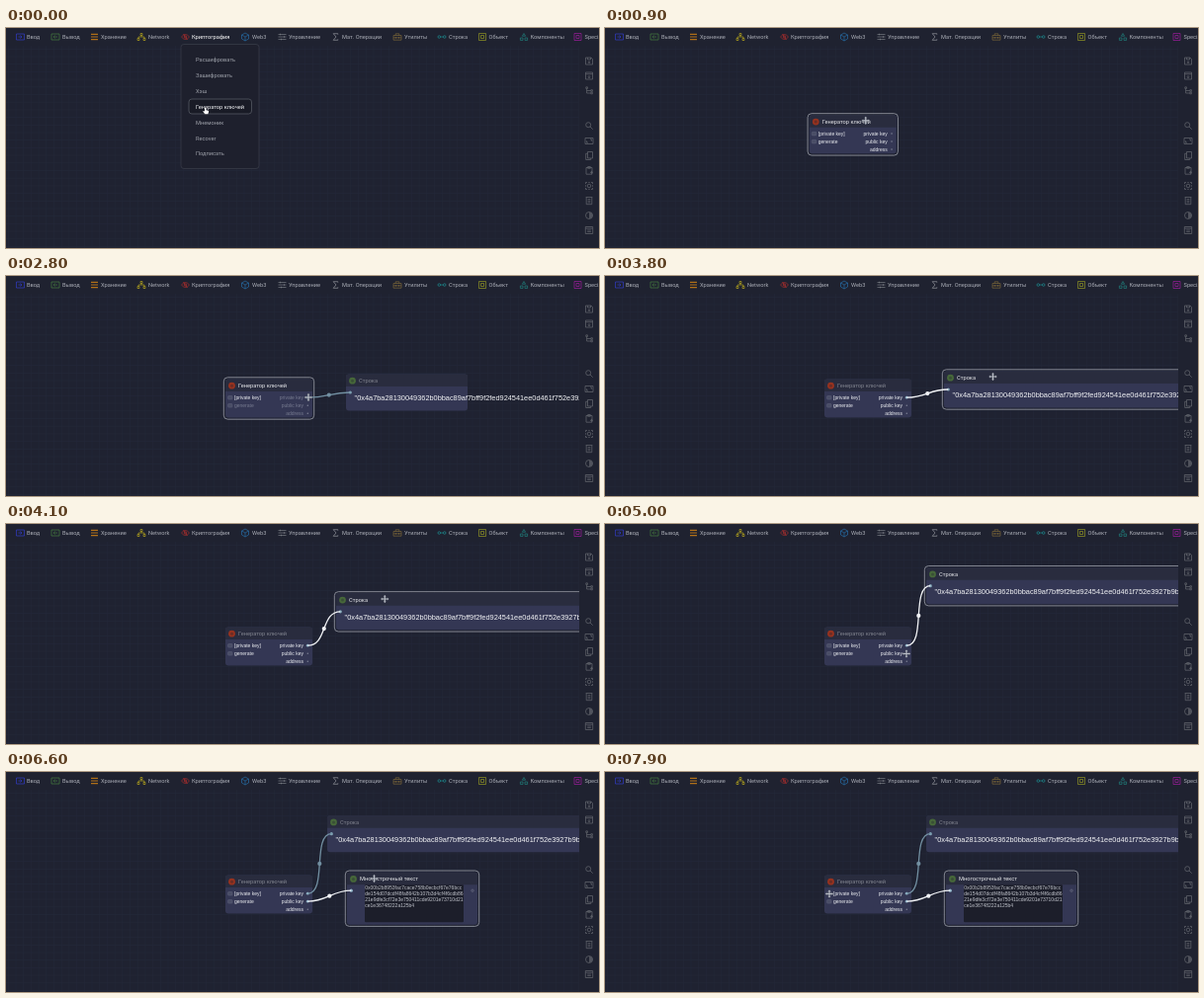
Animation, 600 px wide and 223 px high, one loop 8000 ms. Source, as an HTML page with a canvas:

```html
<!DOCTYPE html>
<html lang="ru">
<head>
<meta charset="utf-8">
<style>
html, body { margin: 0; width: 100%; height: 100%; overflow: hidden; background: #1f2231; }
canvas { display: block; width: 600px; height: 223px; }
</style>
</head>
<body>
<canvas id="stage"></canvas>
<script>
const W = 600, H = 223, LOOP = 8000, STEP = 100;
const UI = 'Roboto, "Open Sans", sans-serif';
const ARIAL = '"Liberation Sans", Arial, sans-serif';
const canvas = document.getElementById('stage');
const ctx = canvas.getContext('2d');
const scale = window.devicePixelRatio || 1;
canvas.width = W * scale;
canvas.height = H * scale;

// Icon outlines, drawn around their own centre
const ICONS = {
  input: 'M-4-3H4V3H-4ZM-2 0H1M0-1.5L1.5 0L0 1.5',
  output: 'M-4-3H4V3H-4ZM-1 0H2M-.5-1.5L-2 0L-.5 1.5',
  bars: 'M-3.5-2.6H3.5M-3.5 0H3.5M-3.5 2.6H3.5',
  network: 'M-1-3.5H1V-1.5H-1ZM0-1.5V0M-3 1.5V0H3V1.5M-4 1.5H-2V3.5H-4ZM2 1.5H4V3.5H2Z',
  eye: 'M-4 0Q0-5 4 0Q0 5-4 0ZM-1.2 0A1.2 1.2 0 1 0 1.2 0A1.2 1.2 0 1 0-1.2 0M-2-3L2 3',
  cube: 'M0-4L3.5-2V2L0 4L-3.5 2V-2ZM-3.5-2L0 0L3.5-2M0 0V4',
  sliders: 'M-4-2.5H4M-4 0H4M-4 2.5H4M-2-3.3V-1.7M2-.8V.8M-1 1.7V3.3',
  sigma: 'M2.3-2.3V-3.3H-2.3L.5 0L-2.3 3.3H2.3V2.3',
  toolbox: 'M-4-1.5H4V3.2H-4ZM-1.8-1.5V-3.2H1.8V-1.5M-4 .8H4M-1.5 0V1.6M1.5 0V1.6',
  link: 'M-4 0A1.3 1.3 0 1 0-1.4 0A1.3 1.3 0 1 0-4 0M-1.4 0H1.4M1.4 0A1.3 1.3 0 1 0 4 0A1.3 1.3 0 1 0 1.4 0',
  object: 'M-3.5-3.5H3.5V3.5H-3.5ZM-1.5-1.5H1.5V1.5H-1.5Z',
  parts: 'M0-3.5L1.6-.8H-1.6ZM-3.6 1H-1V3.4H-3.6ZM1 1H3.6V3.4H1Z',
  save: 'M-3.5-3.5H2L3.5-2V3.5H-3.5ZM-1.5-3.5V-1.5H1.5V-3.5M0 0V2.5M-1.2 1.3H1.2',
  load: 'M-3.5-3.5H3.5V3.5H-3.5ZM-3.5-1.8H3.5M-1.3 1L0 2.2L1.3 1M0-.5V2',
  branch: 'M-3.2-3.7H-1.6V-2.1H-3.2ZM-2.4-2.1V2.5H1.8M-2.4 0H1.8M1.8-.8H3.4V.8H1.8ZM1.8 1.7H3.4V3.3H1.8Z',
  zoom: 'M-3.3-.8A2.5 2.5 0 1 0 1.7-.8A2.5 2.5 0 1 0-3.3-.8M1 1L3.7 3.7',
  fit: 'M-4-3H4V3H-4ZM-2.5 0V1.6H-1M2.5 0V-1.6H1',
  copy: 'M-1.5-4H3.5V2.5H-1.5ZM-1.5-2.2H-3.3V4H1.7V2.5',
  paste: 'M-3-3H3V3.7H-3ZM-1.3-4H1.3V-2.2H-1.3ZM1 1.8H4M2.5 .3V3.3',
  pick: 'M-3.5-2V-3.5H-2M2-3.5H3.5V-2M3.5 2V3.5H2M-2 3.5H-3.5V2M-1.8 0A1.8 1.8 0 1 0 1.8 0A1.8 1.8 0 1 0-1.8 0M-3.5-.7V.7M3.5-.7V.7M-.7-3.5H.7M-.7 3.5H.7',
  trash: 'M-3.3-3.5H3.3M-2.8-3.5V3.7H2.8V-3.5M-1.3-1.4H1.3M-1.3 .2H1.3M-1.3 1.8H1.3',
  contrast: 'M-3.5 0A3.5 3.5 0 1 0 3.5 0A3.5 3.5 0 1 0-3.5 0M.6-3V3M1.4-2.8V2.8M2.2-2.3V2.3M2.9-1.5V1.5',
  library: 'M-3.7-3.5H3.7V3.5H-3.7ZM-3.7-1.8H3.7M-1.8 0H1.8M-1.8 1.6H1.8'
};
const MENU = [
  [14.5, 21, 'Ввод', 'input', '#3440e0'], [50, 57, 'Вывод', 'output', '#4c8a42'],
  [89.5, 96, 'Хранение', 'bars', '#e08a10'], [137, 144, 'Network', 'network', '#c8b51c'],
  [181.5, 188, 'Криптография', 'eye', '#c0302c'], [242, 249, 'Web3', 'cube', '#2878b8'],
  [279.5, 286, 'Управление', 'sliders', '#85888f'], [333.5, 340, 'Мат. Операции', 'sigma', '#a4a6ad'],
  [396, 403, 'Утилиты', 'toolbox', '#86703a'], [441, 448, 'Строка', 'link', '#1c9a9c'],
  [482, 488.5, 'Объект', 'object', '#a5a822'], [524, 530.5, 'Компоненты', 'parts', '#208f88'],
  [578.5, 585.5, 'Special', 'object', '#b01cae']
];
const TOOLS = [
  [33.5, 'save'], [48.5, 'load'], [63.5, 'branch'], [99, 'zoom'], [114.5, 'fit'], [129.5, 'copy'],
  [144.5, 'paste'], [160, 'pick'], [175, 'trash'], [190, 'contrast'], [205, 'library']
];
const DROPDOWN = ['Расшифровать', 'Зашифровать', 'Хэш', 'Генератор ключей', 'Мнемоник', 'Recover', 'Подписать'];
const PRIVATE_KEY = '"0x4a7ba28130049362b0bbac89af7bff9f2fed924541ee0d461f752e3927b9b0c4"';
const PUBLIC_KEY = [
  '0x00b2b8953fac7cace758b0ecbcf67e76bcc', 'de154d07dcdf48fa8642b107b3d4cf4f6cdb86',
  '21e9dfe3cf72e3e750411cde9201e73710d21', 'ce1e36748222a125b4'
];

// Keyframes: [time, x, y]
const CURSOR = [
  [0, 202, 84], [500, 202, 84], [800, 262, 92], [1300, 279, 110], [1600, 279, 110], [2100, 306, 123],
  [2900, 306, 123], [3500, 393, 105], [3700, 393, 105], [3800, 392.5, 102], [4400, 374, 50],
  [4600, 374, 50], [5000, 305, 131.5], [5500, 305, 131.5], [5900, 371.5, 114.5], [6000, 371.5, 114.5],
  [6100, 369, 115], [6600, 372.5, 108], [6900, 372.5, 108], [7600, 227, 123.5]
];
const GENERATOR = [[800, 205, 86.5], [1300, 222, 104.5]];
const STRING = [[3700, 344, 99.5], [3800, 343, 96.5], [4400, 325, 44.2]];
const MULTILINE = [[6000, 344, 108], [6100, 341.5, 108.7], [6600, 345, 101.7]];

function at(keys, t) {
  const next = keys.findIndex(k => k[0] > t);
  if (next === 0) return keys[0].slice(1);
  if (next < 0) return keys[keys.length - 1].slice(1);
  const [t0, x0, y0] = keys[next - 1], [t1, x1, y1] = keys[next];
  const u = (t - t0) / (t1 - t0), e = u * u * (3 - 2 * u);
  return [x0 + (x1 - x0) * e, y0 + (y1 - y0) * e];
}

function text(str, x, y, color, size = 5.7, font = UI, align = 'left') {
  ctx.font = `${size}px ${font}`;
  ctx.textAlign = align;
  ctx.textBaseline = 'alphabetic';
  ctx.fillStyle = color;
  ctx.fillText(str, x, y + size * 0.36);
}

function box(x, y, w, h, r, fill, stroke, line = 1) {
  ctx.beginPath();
  ctx.roundRect(x, y, w, h, r);
  if (fill) { ctx.fillStyle = fill; ctx.fill(); }
  if (stroke) { ctx.strokeStyle = stroke; ctx.lineWidth = line; ctx.stroke(); }
}

function dot(x, y, r, color) {
  ctx.beginPath();
  ctx.arc(x, y, r, 0, 2 * Math.PI);
  ctx.fillStyle = color;
  ctx.fill();
}

function icon(name, x, y, color, line = 0.8) {
  ctx.save();
  ctx.translate(x, y);
  ctx.strokeStyle = color;
  ctx.lineWidth = line;
  ctx.stroke(new Path2D(ICONS[name]));
  ctx.restore();
}

function drawGrid() {
  ctx.fillStyle = '#1f2231';
  ctx.fillRect(0, 0, W, H);
  ctx.fillStyle = '#242839';
  const pitch = 7.7;
  for (let x = 2; x < W; x += pitch) ctx.fillRect(x, 18, 0.6, H);
  for (let y = 21; y < H; y += pitch) ctx.fillRect(0, y, W, 0.6);
}

function drawBars(menuOpen) {
  ctx.fillStyle = '#1f2230';
  ctx.fillRect(0, 0, W, 18);
  ctx.fillRect(580, 18, 20, H);
  for (const [iconX, x, label, name, color] of MENU) {
    ctx.globalAlpha = 0.75;
    icon(name, iconX, 9, color, name === 'bars' ? 1.2 : 0.8);
    ctx.globalAlpha = 1;
    text(label, x, 9, menuOpen && name === 'eye' ? '#ffffff' : '#a9acb5');
  }
  for (const [y, name] of TOOLS) icon(name, 590, y, '#62656c', 0.75);
}

function drawDropdown() {
  box(177, 16.5, 79, 126, 3, '#1e202d', '#383b48', 0.8);
  DROPDOWN.forEach((label, i) => {
    const y = 32 + i * 15.9, hover = i === 3;
    if (hover) box(185, y - 7.7, 63.5, 15, 3, '#191b26', '#555862', 0.8);
    text(label, 192, y, hover ? '#f2f3f5' : '#9da0a9');
  });
}

function drawFrame(x, y, w, h, title, color, selected) {
  box(x, y, w, h, 3, '#343754');
  box(x, y, w, 12.5, [3, 3, 0, 0], '#292c3e');
  if (selected) box(x - 1.7, y - 1.7, w + 3.4, h + 3.4, 4, null, '#8f929d', 0.9);
  dot(x + 6.5, y + 6.7, 3.4, color);
  dot(x + 6.5, y + 6.7, 1.5, 'rgba(31, 34, 48, 0.35)');
  text(title, x + 13, y + 6.5, selected ? '#e6e7ea' : '#80838e');
}

function drawGenerator([x, y], selected, dimmed, linked) {
  drawFrame(x, y, 88, 39, 'Генератор ключей', '#96321f', selected);
  const bright = '#eceef2', dim = '#777b90';
  const label = (str, lx, row, color, align) => text(str, x + lx, y + 19 + row * 8, color, 5, ARIAL, align);
  ['[private key]', 'generate'].forEach((str, i) => {
    box(x + 2.5, y + 17 + i * 8, 4.5, 3.6, 0.8, '#4a4e66', '#5d617a', 0.5);
    label(str, 9, i, dimmed && i ? dim : bright, 'left');
  });
  ['private key', 'public key', 'address'].forEach((str, i) => {
    label(str, 79, i, dimmed ? dim : bright, 'right');
    dot(x + 83.3, y + 18.7 + i * 8, i < linked ? 1.4 : 0.8, i < linked ? '#8fb4c8' : '#7b7f93');
  });
}

function drawString([x, y], selected, wide) {
  drawFrame(x, y, wide ? 300 : 123, 37, 'Строка', '#47683a', selected);
  dot(x + 4.3, y + 18.5, 1.6, '#7fa3b5');
  text(PRIVATE_KEY, x + 8.6, y + 24, '#f4f5f7', 7.37, ARIAL);
}

function drawMultiline([x, y], selected) {
  drawFrame(x, y, 132, 53, 'Многострочный текст', '#47683a', selected);
  box(x + 18, y + 12.5, 100, 38, 1, '#1c1e2a');
  PUBLIC_KEY.forEach((line, i) => text(line, x + 18.3, y + 15.5 + i * 6, '#c0c3cb', 5, ARIAL));
  dot(x + 4.3, y + 18.5, 1.6, '#8fb4c8');
  ctx.beginPath();
  ctx.arc(x + 127, y + 18.5, 1.2, 0, 2 * Math.PI);
  ctx.strokeStyle = '#74788c';
  ctx.lineWidth = 0.6;
  ctx.stroke();
}

function drawLink(x0, y0, [nodeX, nodeY], color) {
  const x1 = nodeX + 4.3, y1 = nodeY + 18.5, bend = 20;
  ctx.beginPath();
  ctx.moveTo(x0, y0);
  ctx.bezierCurveTo(x0 + bend, y0, x1 - bend, y1, x1, y1);
  ctx.strokeStyle = color;
  ctx.lineWidth = 1.3;
  ctx.stroke();
  dot((x0 + x1) / 2, (y0 + y1) / 2, 2.1, color);
}

function drawCursor([x, y], pointing) {
  ctx.save();
  ctx.translate(x, y);
  const shape = new Path2D(pointing
    ? 'M-1-3.2Q0-4 .6-3V-.8L2.8-.3Q3.4 0 3 1.4L2.3 3.2H-.8L-2.8 .6Q-2.4-.4-1 .5Z'
    : 'M0-4L1.2-2.6H.6V-.6H2.6V-1.2L4 0L2.6 1.2V.6H.6V2.6H1.2L0 4L-1.2 2.6H-.6V.6H-2.6V1.2L-4 0L-2.6-1.2V-.6H-.6V-2.6H-1.2Z');
  ctx.lineJoin = 'round';
  ctx.lineWidth = 0.8;
  ctx.strokeStyle = pointing ? '#14151c' : '#4a4e5c';
  ctx.stroke(shape);
  ctx.fillStyle = pointing ? '#ffffff' : '#b9bdc6';
  ctx.fill(shape);
  ctx.restore();
}

function draw(t) {
  const menuOpen = t < 500, hasString = t >= 2500, hasMultiline = t >= 5300;
  const stringSelected = t >= 3600 && t < 5900, multilineSelected = t >= 5900;
  const generator = at(GENERATOR, t), string = at(STRING, t), multiline = at(MULTILINE, t);
  const [portX, portY] = [generator[0] + 83.3, generator[1] + 18.7];
  const linkColor = selected => selected ? '#f0f2f5' : '#7290a2';

  ctx.setTransform(scale, 0, 0, scale, 0, 0);
  drawGrid();
  if (t >= 600) {
    const dimmed = (t >= 2400 && t < 3000) || (t >= 5200 && t < 5500);
    drawGenerator(generator, t < 3600, dimmed, hasString + hasMultiline);
  }
  if (hasString) {
    drawString(string, stringSelected, t >= 3000);
    drawLink(portX, portY, string, linkColor(stringSelected));
  }
  if (hasMultiline) {
    drawMultiline(multiline, multilineSelected);
    drawLink(portX, portY + 8, multiline, linkColor(multilineSelected));
  }
  drawBars(menuOpen);
  if (menuOpen) drawDropdown();
  drawCursor(at(CURSOR, t), menuOpen);
}

const start = performance.now();
function tick() {
  const elapsed = (performance.now() - start) % LOOP;
  draw(Math.floor(elapsed / STEP) * STEP);
  requestAnimationFrame(tick);
}
tick();
</script>
</body>
</html>
```
